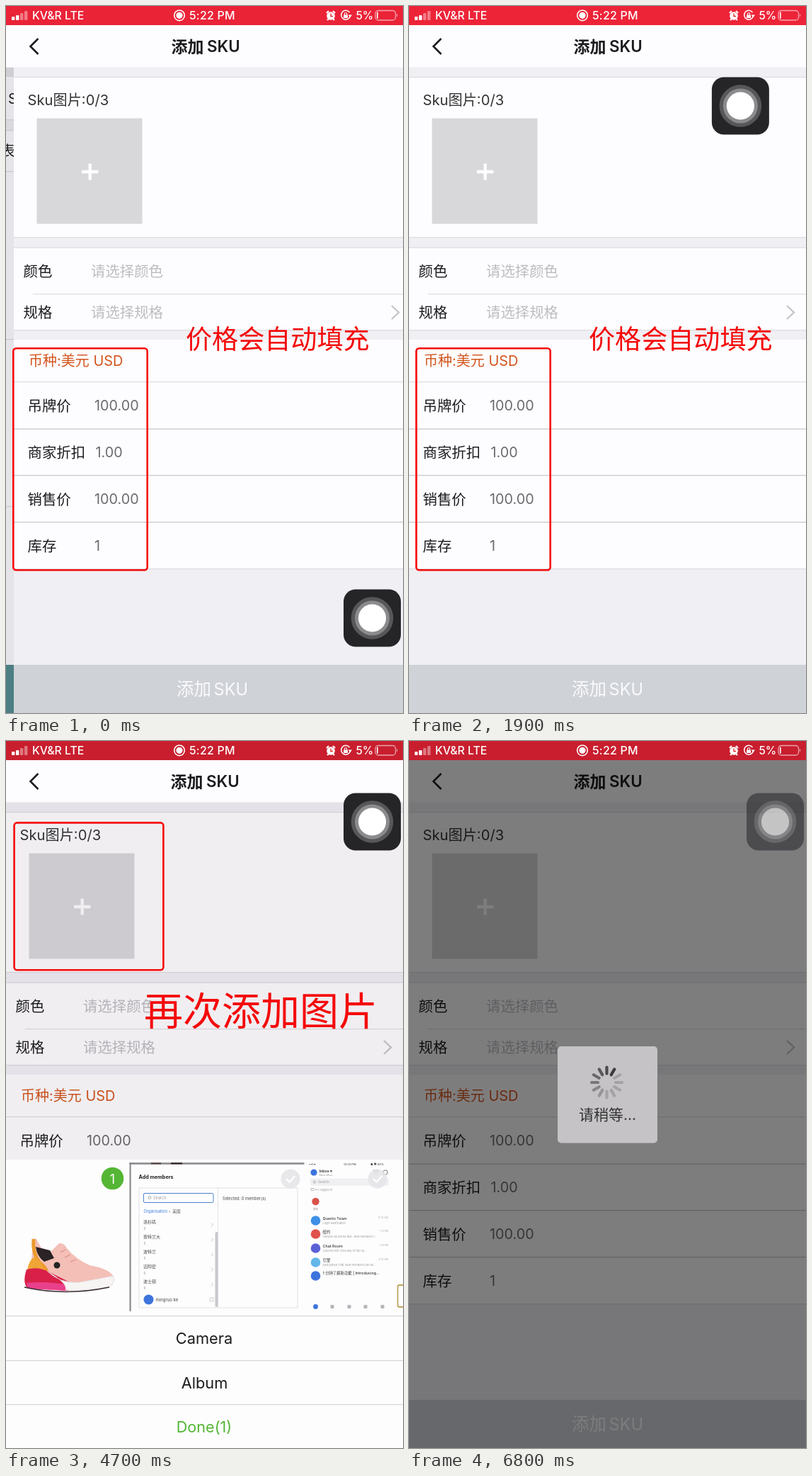
Write an HTML page that moves like this. It is 561 px wide and 998 px high and loops after 6900 ms.

```html
<!DOCTYPE html>
<html lang="zh">
<head>
<meta charset="utf-8">
<title>添加SKU</title>
<style>
html, body { margin: 0; width: 100%; height: 100%; overflow: hidden; background: #f0eff4; }
svg { display: block; width: 100vw; height: 100vh; }
text { font-family: Inter, "Noto Sans CJK SC", "Noto Sans CJK", sans-serif; white-space: pre; }
</style>
</head>
<body>
<svg id="stage" viewBox="0 0 561 998" preserveAspectRatio="none"></svg>
<script>
const LOOP = 6900, STEP = 100;
const INK = '#1c1c1e', RED = '#f50a0a', EDGE = '#dddce1', RULE = '#c6c5c9';

// Drawing helpers; text is placed by its vertical centre.
const T = (x, cy, size, str, fill = INK, extra = '') =>
  `<text x="${x}" y="${cy + size * 0.37}" font-size="${size}" fill="${fill}" ${extra}>${str}</text>`;
const R = (x, y, w, h, fill, extra = '') =>
  `<rect x="${x}" y="${y}" width="${w}" height="${h}" fill="${fill}" ${extra}/>`;
const C = (x, y, r, fill, extra = '') => `<circle cx="${x}" cy="${y}" r="${r}" fill="${fill}" ${extra}/>`;
const P = (d, fill, stroke = 'none', w = 1, extra = '') =>
  `<path d="${d}" fill="${fill}" stroke="${stroke}" stroke-width="${w}" ${extra}/>`;
const G = (id, body, extra = '') => `<g id="${id}" ${extra}>${body}</g>`;
const H = (y, x = 0, color = EDGE) => R(x, y, 561 - x, 1.2, color);
const MID = 'text-anchor="middle"';
const BOLD = 'font-weight="600"';

function statusBar() {
  const bars = [5, 7, 10, 13].map((h, i) =>
    R(8 + i * 6, 20 - h, 4.4, h, '#fff', `rx="1" opacity="${i < 2 ? 1 : 0.4}"`)).join('');
  const alarm = C(459, 14, 5.8, '#fff') + P('M453 10L456 7M465 10L462 7M454 20L456 18M464 20L462 18', 'none', '#fff', 2.2) +
    P('M459 10.5V14.5H462', 'none', '#d22', 1.3);
  const lock = P('M485.5 9A6.5 6.5 0 1 0 486.5 14', 'none', '#fff', 1.5) + P('M483.5 12.5H489L486.4 16Z', '#fff') +
    R(477, 12.5, 6, 4.5, '#fff', 'rx=".8"') + P('M478.3 13V11.5A1.7 1.7 0 0 1 481.7 11.5V13', 'none', '#fff', 1.1);
  const battery = R(522, 6.5, 28.5, 13.5, 'none', 'rx="4" stroke="#fff" stroke-opacity=".6" stroke-width="1.3"') +
    R(524, 8.5, 1.6, 9.5, '#fff', 'rx=".8"') + P('M552 11Q554.5 13.2 552 15.5Z', '#fff', 'none', 1, 'opacity=".6"');
  return R(0, 0, 561, 27, '#e0', 'id="bar"') + bars + T(37, 13.5, 15.8, 'KV&amp;R LTE', '#fff', 'font-weight="500"') +
    C(245, 13.3, 7.3, 'none', 'stroke="#fff" stroke-width="1.6"') + C(245, 13.3, 4.6, '#fff') +
    T(259, 13.5, 16, '5:22 PM', '#fff', 'font-weight="500" letter-spacing=".2"') +
    alarm + lock + T(494.5, 13.5, 15.5, '5%', '#fff', 'font-weight="500"') + battery;
}

function header() {
  return R(0, 27, 561, 59.5, '#fdfcfe') + P('M45.5 46L34.5 57L45.5 68', 'none', INK, 2.6) +
    G('title', T(232.5, 57, 23, '添加', INK, BOLD) + T(283, 57, 22.4, 'SKU', INK, BOLD));
}

function previousPage() {
  const rules = [160, 175, 233, 470, 706].map(y => R(0, y, 12, 1.2, '#c9c8cd')).join('');
  return R(0, 86, 561, 912, '#e5e4e8') + R(0, 87, 12, 13, '#cfced3') + R(0, 161, 12, 14, '#dad9de') + rules +
    T(3, 131, 20, 'S') + T(-8, 204, 20.5, '表') + R(0, 930, 12, 68, '#4b7f83');
}

function formPage() {
  const row = (cy, label, value, x = 114) => T(19.5, cy, 20.4, label) + T(x, cy, 19.8, value, '#6a696c');
  const pick = (cy, label, hint) => T(13.5, cy, 20.4, label) + T(109, cy, 20.4, hint, '#bdbcc0');
  return R(0, 86, 561, 912, '#f0eff4') +
    R(0, 101, 561, 225, '#fdfcfe') + R(0, 341, 561, 116, '#fdfcfe') + R(0, 471, 561, 323, '#fdfcfe') +
    [100, 326, 340.5, 457, 530].map(y => H(y)).join('') + H(406, 27) +
    [596.5, 662, 728].map(y => H(y, 0, RULE)).join('') + H(794, 0) +
    T(19.5, 133, 20.2, 'Sku图片:0/3', '#333') + R(32.5, 158.5, 149, 149, '#d8d7da') +
    P('M96 234H119.5M107.7 222.5V245.5', 'none', '#fdfcfe', 4.4) +
    pick(374, '颜色', '请选择颜色') + pick(432.5, '规格', '请选择规格') +
    P('M534 423L544 432.5L534 442', 'none', '#c5c4c9', 2.3) +
    T(21, 501, 20, '币种:美元 USD', '#d2551c') +
    row(564, '吊牌价', '100.00') + row(630, '商家折扣', '1.00', 115.5) +
    row(696, '销售价', '100.00') + row(762, '库存', '1') +
    R(0, 930, 561, 68, '#cfd2d7') + T(230, 964, 24.5, '添加', '#fafafc') + T(282.5, 964, 23.6, 'SKU', '#fafafc');
}

function shoe() {
  return P('M38 708Q37 700 43 703L50 716L64 720L75 709Q82 708 86 716Q98 731 118 740Q148 745 153 758L150 768L92 770L32 762Q36 738 38 708Z', '#f3bfb6') +
    P('M42 714L62 719L68 730L54 735Q44 728 42 714Z', '#2a2224') +
    P('M39 703Q37 722 47 736Q58 744 60 756', 'none', '#eb9a2c', 5) +
    P('M41 728Q32 732 30 748L58 752L50 738Z', '#f0a637') +
    P('M29 746Q46 741 62 750Q76 757 92 765L88 776L30 772Q23 764 29 746Z', '#d92048') +
    P('M29 765Q56 762 88 768L86 776L31 773Z', '#e9408b') +
    P('M58 748Q76 766 104 764L152 755Q154 764 147 770Q116 777 84 775Q88 766 58 748Z', '#f7f4f4', '#ddd6d6', 0.6) +
    P('M26 771Q84 784 146 771', 'none', '#3a2c2f', 1.6) +
    P('M84 718L77 722M91 725L83 729M99 732L91 735', 'none', '#e39c98', 1.6) + C(72, 740, 4.5, '#222');
}

function memberShot() {
  const towns = ['洛杉矶', '查特兰大', '波特兰', '迈阿密', '波士顿'].map((s, i) => {
    const y = 679 + i * 21;
    return T(194, y, 6, s, '#444') + T(194.5, y + 9, 4.5, '0', '#888') +
      P(`M290 ${y + 1.5}l2.5 2.5l-2.5 2.5`, 'none', '#bbb', 0.8);
  }).join('');
  return R(174.5, 595, 247, 210, '#fdfdfe') + R(174.5, 595, 247, 2.8, '#929196') + R(174.5, 595, 2.2, 210, '#8b8a8e') +
    R(205, 595, 14, 2.4, '#5c4d4c') + R(233, 595, 16, 2.4, '#3c3030') +
    T(187.5, 615, 7.2, 'Add members', '#222', 'font-weight="700"') +
    R(188, 631, 224, 169, 'none', 'stroke="#e2e2e6"') + R(299, 631, 1, 169, '#e2e2e6') +
    R(194.5, 638.5, 98.5, 13, '#fff', 'rx="1.5" stroke="#4f83cf"') +
    C(203, 644.5, 2, 'none', 'stroke="#888" stroke-width=".7"') + T(208, 645, 5.6, 'Search', '#999') +
    T(306, 645.5, 5.7, 'Selected: 0 member(s)', '#444') +
    T(194.5, 664, 5.6, 'Organisation', '#3f7fe0') + T(230, 664, 5.6, '›  美国', '#555') + towns +
    R(295.5, 693, 4, 106, '#c9c9cd', 'rx="2"') + C(201.5, 788.5, 7, '#3d74dc') +
    T(211.5, 789, 6, 'mingruo ke', '#444') + R(288, 786, 5, 5, 'none', 'rx="1" stroke="#bbb" stroke-width=".8"');
}

function inboxShot() {
  const rows = [
    [676, '#3f8fe8', 'Quenlo Team', 'Login Notification', '11:02 AM'],
    [695, '#e0524c', '纽约', 'mingruo ke joined 纽约. New members c...', '1:12 PM'],
    [715, '#5b62d6', 'Chat Room', '[Quenlo bot] Click any of the op...', '1:18 PM'],
    [735, '#62b6e8', '引擎', 'Date joined 引擎. New members can se...', '9:37 AM'],
    [754, '#3d74dc', '1 分钟了解新功能 | Introducing...', '', '']
  ].map(([y, color, name, note, time]) => C(437.5, y + 1, 6.8, color) +
    T(447.5, y - (note ? 2 : 2.5), 5.4, name, '#333', 'font-weight="500"') + T(447.5, y + 4.5, 3.9, note, '#999') +
    T(540, y - 3, 3.4, time, '#aaa', 'text-anchor="end"')).join('');
  const tabs = [461, 485, 508, 532].map(x => R(x - 2.5, 796, 5, 5, '#b5b5ba', 'rx="1"')).join('');
  return R(422, 595, 139, 210, '#fdfdfe') + T(428, 598, 4, '••ıl ▾', '#333') + T(477, 598, 4, '12:03 PM', '#333') +
    T(515, 598, 4, '● ◉ 80%', '#333') + C(435, 609, 4.6, '#3d74dc') + T(442.5, 607.5, 5.3, 'Inbox ▾', '#333', BOLD) +
    T(442.5, 613, 3.6, 'Main office', '#999') + P('M519 606H526L522.5 611Z', 'none', '#666', 0.9) +
    C(536, 609, 3.2, 'none', 'stroke="#666" stroke-width=".9"') + R(430, 617.5, 111, 10, '#f0f0f3', 'rx="2"') +
    C(436, 622.5, 1.7, 'none', 'stroke="#888" stroke-width=".6"') + T(441, 622.5, 4.8, 'Search', '#999') +
    R(431, 631.5, 4, 3, 'none', 'stroke="#999" stroke-width=".6"') + T(437, 633.5, 4, 'PC logged in', '#999') +
    C(437.5, 650, 5.2, '#d9534b') + T(437.5, 661, 3.5, '通讯', '#888', MID) + rows +
    C(437.5, 798.5, 3.4, '#3d74dc') + tabs +
    P('M561 768H556Q553.5 768 553.5 771V796Q553.5 799 556 799H561', '#fff', '#bfa45c', 1.8);
}

function sheet() {
  const tick = x => C(x, 618, 13.5, '#e4e4e7', 'opacity=".85"') +
    P(`M${x - 6} 618l4.5 4.5l8 -8.5`, 'none', '#fff', 2.4);
  return R(0, 591, 561, 420, '#fdfdfe') + shoe() + memberShot() + inboxShot() + tick(402) + tick(525) +
    G('unpicked', tick(150.5) + T(280.5, 968, 21.6, 'Cancel', INK, MID)) +
    G('picked', C(150.5, 617.5, 15.8, '#54b634') + T(150.5, 618, 18, '1', '#fff', MID) +
      T(280, 968, 21.6, 'Done(1)', '#54b634', MID)) +
    [811, 874, 936].map(y => H(y, 0, '#d5d4d8')).join('') +
    T(280, 843, 21.8, 'Camera', INK, MID) + T(280.5, 905.5, 21.8, 'Album', INK, MID);
}

const spinner = (id, x, y, color) => G(id, Array.from({ length: 12 }, (_, i) =>
  `<line y1="-12.5" y2="-21.5" transform="rotate(${i * 30})"/>`).join(''),
  `transform="translate(${x} ${y})" stroke="${color}" stroke-width="4.2" stroke-linecap="round"`);

const frame = (x, y, w, h) => R(x, y, w, h, 'none', `rx="4" stroke="${RED}" stroke-width="2.6"`);

document.getElementById('stage').innerHTML =
  previousPage() + G('page', formPage()) + R(0, 86, 561, 912, '#120a1c', 'id="dim" opacity=".055"') +
  header() + G('sheet', sheet()) +
  G('wait', R(206, 445, 149, 108, '#6f6e71', 'rx="5"') + spinner('waitSpin', 279.5, 484.5, '#fff') +
    T(280.5, 533, 20.5, 'waiting...', '#f4f4f5', MID)) +
  G('priceNote', frame(10.3, 483.3, 189.4, 313) + T(254, 470, 37.1, '价格会自动填充', RED, 'font-weight="500"')) +
  G('photoNote', frame(11.6, 115.4, 210.8, 207.8) + T(195, 380.5, 55, '再次添加图片', RED, 'font-weight="500"')) +
  G('busy', R(0, 27, 561, 971, '#000', 'opacity=".5"') + R(210, 431, 141, 136.5, '#c5c3c6', 'rx="5"') +
    spinner('busySpin', 279.5, 482, '#3c3b3e') + T(280.5, 527, 21, '请稍等...', '#333', MID)) +
  G('knob', R(-40.5, -40.5, 81, 81, '#252427', 'rx="17"') + C(0, 0, 29.8, '#575659') + C(0, 0, 24.5, '#8b8a8d') +
    C(0, 0, 19.6, '#fff')) +
  statusBar();

const el = {};
document.querySelectorAll('[id]').forEach(n => el[n.id] = n);

const clamp = v => Math.min(1, Math.max(0, v));
const ramp = (t, a, b) => clamp((t - a) / (b - a));
const ease = p => (1 - Math.cos(Math.PI * p)) / 2;
const show = (id, on) => el[id].setAttribute('display', on ? 'inline' : 'none');
const move = (id, x, y) => el[id].setAttribute('transform', `translate(${x} ${y})`);

// Time, x, y of the floating button.
const DRAG = [[800, 517.5, 864], [1000, 480, 800], [1300, 414, 623], [1600, 416, 330], [1850, 452, 150], [2050, 517.5, 114]];

function along(path, t) {
  const i = path.findIndex(p => p[0] > t);
  if (i === 0) return path[0].slice(1);
  if (i < 0) return path[path.length - 1].slice(1);
  const [a, b] = [path[i - 1], path[i]], p = ramp(t, a[0], b[0]);
  return [1, 2].map(k => a[k] + (b[k] - a[k]) * p);
}

function spin(id, head) {
  [...el[id].children].forEach((spoke, i) => {
    const age = (((head - i) % 12) + 12) % 12;
    spoke.setAttribute('opacity', Math.max(0.24, 1 - age * 0.11).toFixed(2));
  });
}

function draw(t) {
  const off = 11 * (1 - ramp(t, 0, 400)) ** 3;
  move('page', off, 0);
  move('title', off / 11, 0);
  move('knob', ...along(DRAG, t));
  el.knob.setAttribute('opacity', 1 - 0.45 * ramp(t, 5700, 6000));
  move('sheet', 0, 407 * (1 - ease(ramp(t, 2750, 3150)) + ease(ramp(t, 5650, 5900))));
  show('sheet', t > 2750 && t < 5900);
  show('dim', t >= 2700 && t < 5900);
  show('priceNote', t < 2000);
  show('photoNote', t >= 3200 && t < 5700);
  show('picked', t >= 4300);
  show('unpicked', t < 4300);
  show('wait', t >= 5200 && t < 5700);
  show('busy', t >= 5900);
  const turn = Math.round((t - 5600) / 800 * 12);
  spin('waitSpin', 9 + turn);
  spin('busySpin', 7 + turn);
  const glow = (1 + Math.cos((t - 5800) / 1000 * Math.PI)) / 2;
  el.bar.setAttribute('fill', `rgb(${Math.round(200 + 38 * glow)},${Math.round(30 + 6 * glow)},${Math.round(46 + 10 * glow)})`);
}

const start = performance.now();
function tick() {
  const t = (performance.now() - start) % LOOP;
  draw(Math.floor(t / STEP) * STEP);
  requestAnimationFrame(tick);
}
tick();
</script>
</body>
</html>
```
